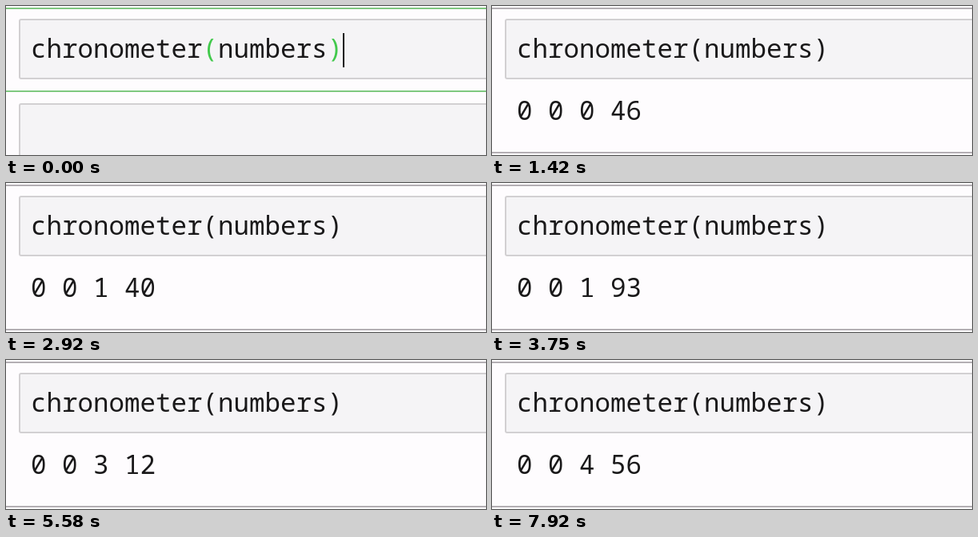
An HTML page for the animation above (8000 ms loop, 600x187 px).

```html
<!DOCTYPE html>
<html lang="en">
<head>
<meta charset="utf-8">
<title>Notebook chronometer</title>
<style>
  html, body { margin: 0; width: 100%; height: 100%; overflow: hidden; background: #fefcfe; }
  svg { display: block; width: 600px; height: 187px; }
  text { font: 32.5px "Noto Sans Mono", "DejaVu Sans Mono", monospace; fill: #1a191a; white-space: pre; }
  .cell { fill: #f5f4f6; stroke: #d2d0d2; stroke-width: 2; }
  .rule { height: 2px; width: 600px; fill: #b3afb3; }
  .editing .rule { fill: #7fc880; }
  .editing .bracket { fill: #42c94c; }
  .editing .result, .running .editor { display: none; }
</style>
</head>
<body>
<svg id="stage" class="editing" viewBox="0 0 600 187">
  <rect class="rule" y="2"/>
  <rect class="cell" x="17" y="17" width="600" height="74" rx="2"/>
  <text x="31" y="65">chronometer<tspan class="bracket">(</tspan>numbers<tspan class="bracket">)</tspan></text>
  <g class="editor">
    <rect x="421" y="34" width="2" height="43" fill="#111"/>
    <rect class="rule" y="106"/>
    <rect class="cell" x="17" y="123" width="600" height="80" rx="2"/>
  </g>
  <g class="result">
    <text id="output" x="31" y="143"></text>
    <rect class="rule" y="183"/>
  </g>
</svg>
<script>
  const LOOP = 8000, FPS = 12, START_STEP = 8, LAST_STEP = 95;
  const stage = document.getElementById("stage");
  const output = document.getElementById("output");

  // [step, elapsed hundredths]: the counter's pace drifts slightly
  const pace = [[START_STEP, 0], [17, 46], [35, 140], [55, 246], [67, 312], [84, 398], [LAST_STEP, 456]];

  function hundredthsAt(step) {
    const i = Math.max(1, pace.findIndex(([s]) => s >= step));
    const [s0, c0] = pace[i - 1], [s1, c1] = pace[i];
    return Math.round(c0 + (c1 - c0) * (step - s0) / (s1 - s0));
  }

  function draw(time) {
    // The small offset absorbs step times rounded to 10 ms
    const step = Math.min(LAST_STEP, Math.floor((time % LOOP + 4) * FPS / 1000));
    const running = step >= START_STEP;
    stage.setAttribute("class", running ? "running" : "editing");
    if (running) {
      const count = hundredthsAt(step);
      output.textContent = `0 0 ${Math.floor(count / 100)} ${count % 100}`;
    }
  }

  const begin = performance.now();
  function tick() {
    draw(performance.now() - begin);
    requestAnimationFrame(tick);
  }
  tick();
</script>
</body>
</html>
```
